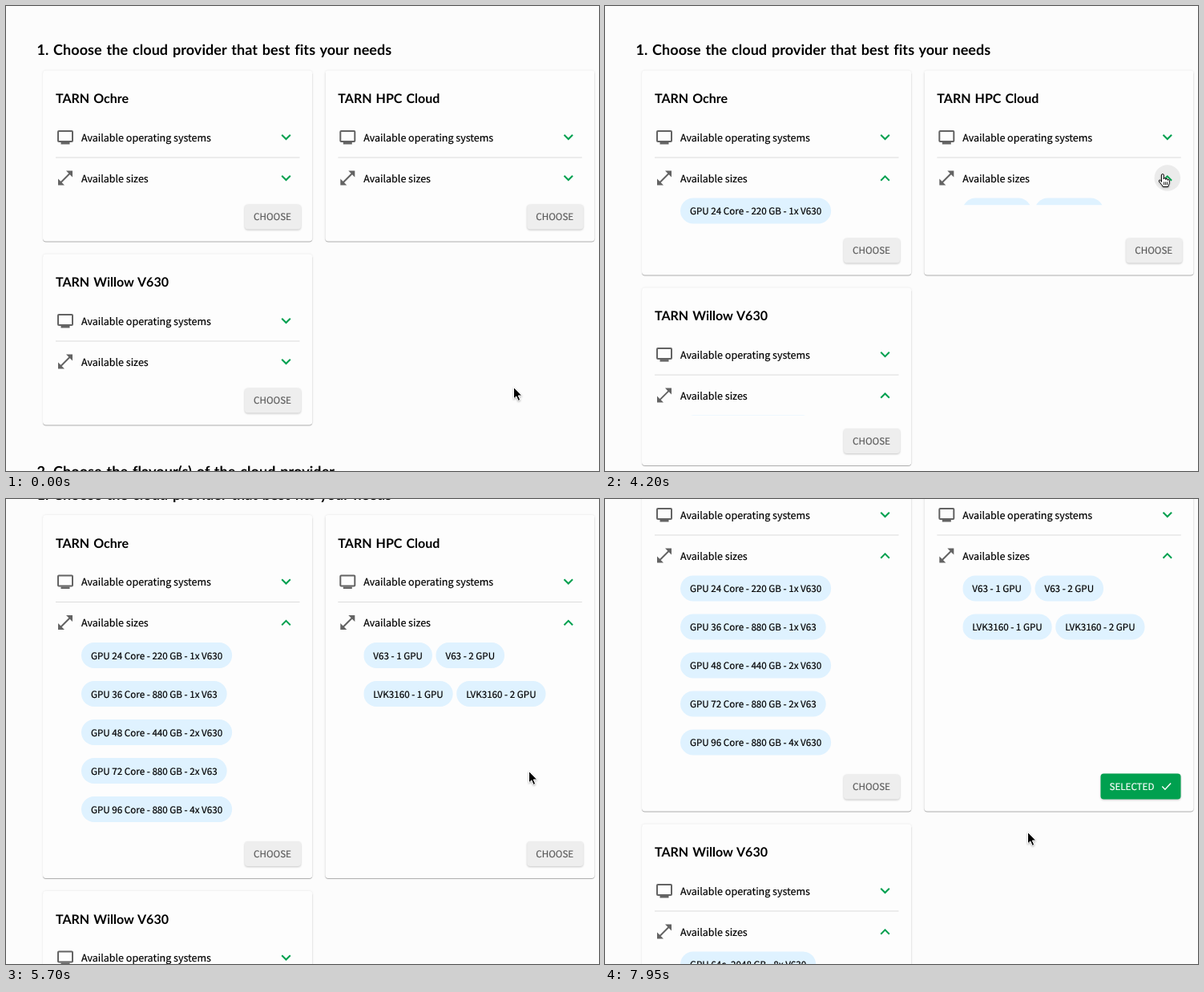
Animation, 740 px wide and 580 px high, one loop 8000 ms. Source, as an HTML page:

```html
<!DOCTYPE html>
<html lang="en">
<head>
<meta charset="utf-8">
<title>Cloud provider choice</title>
<style>
  html, body { margin: 0; width: 100%; height: 100%; overflow: hidden; background: #fcfcfc; }
  #stage { display: block; width: 740px; height: 580px; }
  text { font-family: "Noto Sans CJK SC", "Noto Sans CJK JP", "Noto Sans CJK", "Noto Sans", sans-serif;
    fill: #000; stroke: #000; stroke-width: .2px; text-rendering: geometricPrecision; white-space: pre; }
  .head, .title { font-family: Lato, "Open Sans", sans-serif; font-weight: 700; stroke: none; }
  .head { font-size: 18px; letter-spacing: .07px; word-spacing: 1.3px; }
  .title { font-size: 16px; word-spacing: 1.2px; }
  .row { font-size: 12.5px; }
  .chip, .label { font-size: 11.63px; }
  .label { fill: #5c5c5c; stroke: #5c5c5c; }
  .on .label { fill: #fff; stroke: #fff; }
  .icon { fill: #636363; }
  .chev { fill: #00a04f; }
  .pill { fill: #dff2ff; }
  .card { fill: #fdfdfd; filter: drop-shadow(0 1px .7px rgba(0,0,0,.27)) drop-shadow(0 0 1px rgba(0,0,0,.1)); }
  .btn { fill: #eee; filter: drop-shadow(0 1px 1px rgba(0,0,0,.22)); }
  .on .btn { fill: #00a04f; }
  #arrow, #hand { filter: drop-shadow(0 1px 1px rgba(0,0,0,.3)); }
</style>
</head>
<body>
<svg id="stage" viewBox="0 0 740 580"></svg>
<script>
const LOOP = 8000, STEP = 150;
const LEFT = 46, TOP = 80.5, WIDTH = 336.3, CLOSED = 213, GAP = 16;
const CHIP_ROW = 48, CHIP_PAD = 12, CHIP_GAP = 4.5;
const PICKED = 6900;

const cards = [
  { title: "TARN Ochre", chips: [
    ["GPU 24 Core - 220 GB - 1x V630"],
    ["GPU 36 Core - 880 GB - 1x V63"],
    ["GPU 48 Core - 440 GB - 2x V630"],
    ["GPU 72 Core - 880 GB - 2x V63"],
    ["GPU 96 Core - 880 GB - 4x V630"]] },
  { title: "TARN HPC Cloud", chips: [
    ["V63 - 1 GPU", "V63 - 2 GPU"],
    ["LVK3160 - 1 GPU", "LVK3160 - 2 GPU"]] },
  { title: "TARN Willow V630", chips: [["GPU 64c, 2048 GB - 8x V630"]] }
];

// Each stroke curves from the previous stop past "bend" to "to"; "hand" marks a clickable stop.
const home = [633.5, 475.5];
const strokes = [
  { start: 150, end: 1200, bend: [428, 432], to: [431, 241] },
  { start: 1200, end: 1950, bend: [375, 150], to: [336, 215], hand: true },
  { start: 2700, end: 3300, bend: [513, 212], to: [690, 209], hand: true },
  { start: 4800, end: 5250, bend: [660, 320], to: [652.5, 339.5] },
  { start: 6300, end: 6750, bend: [665, 348], to: [678, 355], hand: true },
  { start: 7200, end: 7950, bend: [590, 425], to: [527.5, 415.5] }
];

const ramp = (t, a, b) => Math.min(1, Math.max(0, (t - a) / (b - a)));
const ease = p => p * p * (3 - 2 * p);

const scrollAt = t => 60.5 * ramp(t, 5100, 5700) + 67.5 * ramp(t, 5700, 6000) + 16 * ramp(t, 6150, 6450);
const openAt = t => ease(ramp(t, 4140, 4365));
const rippleAt = t => t < 4200 ? 0 : 1 - ramp(t, 4200, 4650);

function cursorAt(t) {
  let pos = home, hand = false;
  for (const s of strokes) {
    if (t <= s.start) break;
    const p = ease(ramp(t, s.start, s.end)), q = 1 - p;
    pos = pos.map((v, i) => q * q * v + 2 * p * q * s.bend[i] + p * p * s.to[i]);
    hand = !!s.hand && p === 1;
  }
  return { pos, hand };
}

const text = (cls, x, y, s) => `<text class="${cls}" x="${x}" y="${y}">${s}</text>`;

const chevron = (cls, y) => `<g transform="translate(303.5 ${y})"><path class="chev ${cls}"
  d="M4.59-3.7 0 .87-4.59-3.7-6-2.3l6 6 6-6z"/></g>`;

const chipRow = (labels, row) => labels.map(s =>
  `<g class="slot" data-row="${row}"><rect class="pill" height="32" rx="16"/>${text("chip", CHIP_PAD, 20.5, s)}</g>`).join("");

const button = (cls, x, y, w, h, label, extra = "") => `<g class="choose ${cls}">
  <rect class="btn" x="${x}" y="${y}" width="${w}" height="${h}" rx="4"/>
  ${text("label", x + 11, 19.6, label)}${extra}</g>`;

const selected = button("on", 220.2, -1, 100, 32, "SELECTED",
  '<path d="M297 15l3.6 3.7 7.2-7.6" fill="none" stroke="#fff" stroke-width="1.4"/>');

const cardMarkup = (c, i) => `<g id="card${i}">
  <rect class="card" width="${WIDTH}" rx="4"/>
  ${text("title", 16, 40.5, c.title)}
  <rect x="19" y="75.5" width="18" height="13" rx="1" fill="none" stroke="#636363" stroke-width="2"/>
  <rect class="icon" x="22.5" y="89.5" width="11" height="2.5"/>
  ${text("row", 48, 88, "Available operating systems")}
  ${chevron("", 83.2)}
  <rect x="16" y="108" width="304.5" height="1" fill="#dcdcdc"/>
  <path class="icon" transform="translate(16 122)"
    d="M21 11V3h-8l3.29 3.29-10 10L3 13v8h8l-3.29-3.29 10-10z"/>
  ${text("row", 48, 139, "Available sizes")}
  ${i === 1 ? '<circle id="ripple" cx="303.5" cy="134" r="16.3" fill="#ebebeb"/>' : ""}
  ${chevron("flip", 134.2)}
  <svg class="panel" x="48" y="151" width="288" overflow="hidden">${c.chips.map(chipRow).join("")}</svg>
  ${button("off", 252, 0, 70, 31, "CHOOSE")}
  ${i === 1 ? selected : ""}
</g>`;

const stage = document.getElementById("stage");
stage.innerHTML = `<g id="page">
  ${text("head", 38.5, 61, "1. Choose the cloud provider that best fits your needs")}
  ${cards.map(cardMarkup).join("")}
  <g id="next">${text("head", 38.5, 0, "2. Choose the flavour(s) of the cloud provider")}</g>
</g>
<path id="arrow" d="M0 0V14.4L3.3 11.4 5.7 16.9 8.2 15.8 5.8 10.5H10.3Z"
  stroke="#fff" stroke-width="1" stroke-linejoin="round"/>
<g id="hand" stroke="#000" stroke-linecap="round" stroke-linejoin="round">
  <path fill="#fff" d="M4.4 10V2a1.4 1.4 0 0 1 2.8 0V6.8a1.25 1.25 0 0 1 2.5 .2V7.5
    a1.2 1.2 0 0 1 2.4 .3V8.4a1.1 1.1 0 0 1 2.2 .4V11.5C14.3 13.6 13 14 12.8 16.5H6.2
    C5.8 14.4 3 12.4 1.6 10 .6 8 2.6 7.2 3.6 8.8Z"/>
  <path fill="none" stroke-width=".9" d="M7.6 10.8v3M9.6 10.8v3M11.6 10.8v3"/>
</g>`;

const el = id => document.getElementById(id);
const move = (node, x, y) => node.setAttribute("transform", `translate(${x} ${y})`);
const show = (node, on) => node.setAttribute("visibility", on ? "visible" : "hidden");

const views = cards.map((c, i) => {
  const g = el("card" + i), one = s => g.querySelector(s);
  return { g, bg: one(".card"), panel: one(".panel"), flip: one(".flip"),
    off: one(".off"), buttons: g.querySelectorAll(".choose"), full: c.chips.length * CHIP_ROW };
});

// Pills hug their labels and flow from the left.
for (const v of views) {
  const used = [];
  for (const slot of v.panel.querySelectorAll(".slot")) {
    const row = +slot.dataset.row, x = used[row] || 0;
    const w = slot.querySelector("text").getComputedTextLength() + 2 * CHIP_PAD;
    slot.querySelector("rect").setAttribute("width", w);
    move(slot, x, 8 + row * CHIP_ROW);
    used[row] = x + w + CHIP_GAP;
  }
}

function render(time) {
  const t = Math.floor(time / STEP) * STEP;
  const open = openAt(t), picked = t >= PICKED;
  const { pos, hand } = cursorAt(t);
  const rowHeights = [0, 2].map(i => CLOSED + open * views[i].full);
  const rowTops = [TOP, TOP + rowHeights[0] + GAP];

  views.forEach((v, i) => {
    const row = i >> 1, h = rowHeights[row];
    move(v.g, LEFT + (i % 2) * (WIDTH + GAP), rowTops[row]);
    v.bg.setAttribute("height", h);
    v.panel.setAttribute("height", open * v.full);
    show(v.panel, open > 0);
    v.flip.setAttribute("transform", open > 0 ? "scale(1 -1)" : "");
    v.buttons.forEach(b => move(b, 0, h - 46));
  });

  show(views[1].off, !picked);
  show(views[1].buttons[1], picked);
  el("ripple").setAttribute("opacity", rippleAt(t));
  move(el("next"), 0, rowTops[1] + rowHeights[1] + 64);
  move(el("page"), 0, -scrollAt(t));
  move(el("arrow"), ...pos);
  move(el("hand"), ...pos);
  show(el("arrow"), !hand);
  show(el("hand"), hand);
}

const start = performance.now();
function tick() {
  render((performance.now() - start) % LOOP);
  requestAnimationFrame(tick);
}
tick();
</script>
</body>
</html>
```
